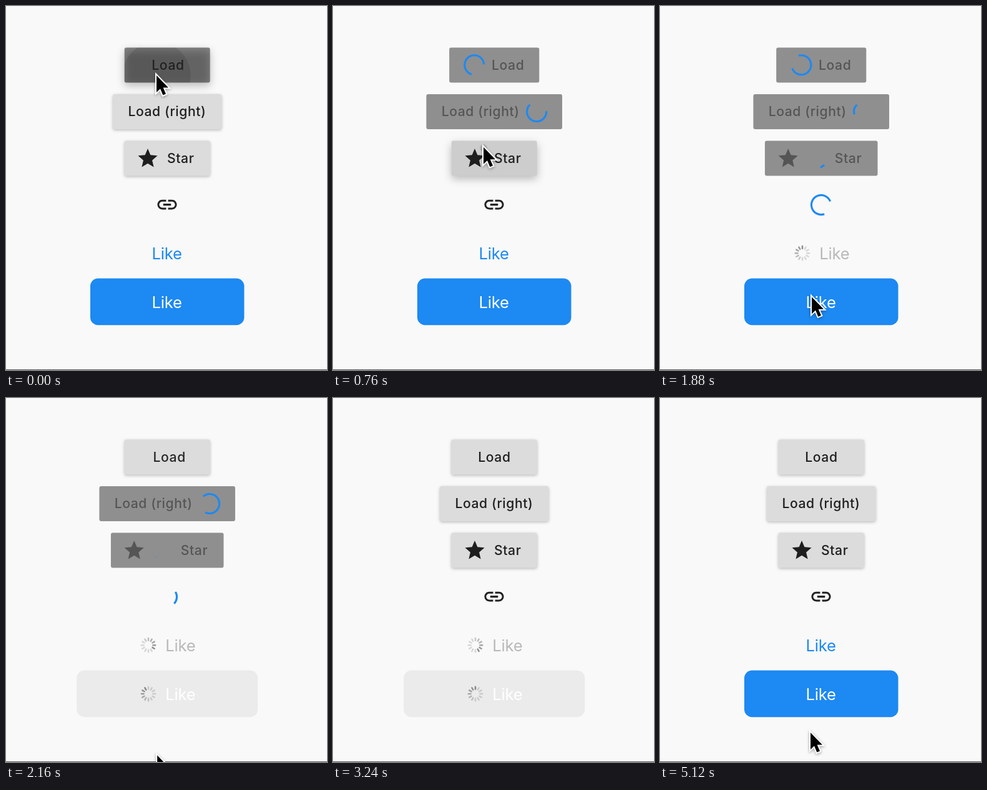
Animation of 514 by 582 pixels, one loop 5.2 s. Source, as an HTML page with a canvas:

```html
<!DOCTYPE html>
<html lang="en">
<head>
<meta charset="utf-8">
<title>Loading buttons</title>
<style>
html, body { margin: 0; width: 100%; height: 100%; overflow: hidden; background: #f9f9f9; }
canvas { display: block; width: 514px; height: 582px; }
</style>
</head>
<body>
<canvas id="stage"></canvas>
<script>
const W = 514, H = 582, LOOP = 5200, DP = 14 / 9;
const LOADING = 2000, FADE = 200, SLOT = 28 * DP, GAP = 6.2;
const BLUE = '#1d89f2', PAPER = '#f9f9f9';
const BUTTON_FONT = '500 21.1px Inter, Roboto, sans-serif';
const LIKE_FONT = '400 25.6px Inter, Roboto, sans-serif';

const canvas = document.getElementById('stage');
const ctx = canvas.getContext('2d');
const ratio = window.devicePixelRatio || 1;
canvas.width = W * ratio;
canvas.height = H * ratio;

const starIcon = new Path2D('M12 17.27L18.18 21l-1.64-7.03L22 9.24l-7.19-.61L12 2 9.19 8.63 2 9.24l5.46 4.73L5.82 21z');
const linkIcon = new Path2D('M3.9 12c0-1.71 1.39-3.1 3.1-3.1h4V7H7c-2.76 0-5 2.24-5 5s2.24 5 5 5h4v-1.9H7c-1.71 0-3.1-1.39-3.1-3.1zM8 13h8v-2H8v2zm9-6h-4v1.9h4c1.71 0 3.1 1.39 3.1 3.1s-1.39 3.1-3.1 3.1h-4V17h4c2.76 0 5-2.24 5-5s-2.24-5-5-5z');
const arrow = new Path2D('M0 0V27L6 21.3 10.3 31.5 15 29.5 10.6 19.6H19Z');

// time, x, y of the pointer tip
const pointerKeys = [
  [0, 241, 111], [180, 241, 111], [360, 241, 168], [440, 241, 170],
  [680, 241, 225], [800, 241, 226], [1080, 241, 318], [1180, 241, 322],
  [1240, 241, 341], [1440, 241, 392], [1580, 242, 398], [1820, 243, 463],
  [1960, 243, 468], [2200, 242, 592], [4520, 236, 592], [4640, 241, 531],
  [5040, 241, 531], [5120, 241, 535], [5200, 241, 535]
];

const clamp = v => Math.min(1, Math.max(0, v));
const mix = (a, b, k) => a + (b - a) * k;
const black = a => `rgba(0,0,0,${a})`;

// cubic-bezier(.4, 0, .2, 1)
function fastOutSlowIn(x) {
  if (x <= 0 || x >= 1) return clamp(x);
  let lo = 0, hi = 1;
  for (let i = 0; i < 18; i++) {
    const u = (lo + hi) / 2, v = 1 - u;
    if (1.2 * v * v * u + 0.6 * v * u * u + u * u * u < x) lo = u; else hi = u;
  }
  return 3 * (1 - lo) * lo * lo + lo * lo * lo;
}

function loadState(t, start) {
  const age = t - start;
  const on = age >= 0 && age < LOADING;
  const open = age < LOADING ? clamp(age / FADE) : 1 - clamp((age - LOADING) / FADE);
  return { age, on, open, room: SLOT * open };
}

function roundRect(x, y, w, h, r) {
  ctx.beginPath();
  ctx.roundRect(x, y, w, h, r);
}

function label(text, x, y, font, spacing, color) {
  ctx.font = font;
  ctx.letterSpacing = spacing + 'px';
  ctx.textAlign = 'center';
  ctx.fillStyle = color;
  ctx.fillText(text, x, y);
}

function icon(path, x, y, color) {
  ctx.save();
  ctx.translate(x - 12 * DP, y - 12 * DP);
  ctx.scale(DP, DP);
  ctx.fillStyle = color;
  ctx.fill(path);
  ctx.restore();
}

function shadow(x, y, w, h, elevation) {
  if (elevation <= 0.02) return;
  const far = 2000;
  ctx.save();
  ctx.shadowColor = black(0.26 * clamp(elevation / 2));
  ctx.shadowBlur = (2 + elevation * 1.5) * ratio;
  ctx.shadowOffsetX = far * ratio;
  ctx.shadowOffsetY = (0.5 + elevation * 0.55) * ratio;
  ctx.fillStyle = '#000';
  roundRect(x - far, y, w, h, 3);
  ctx.fill();
  ctx.restore();
}

function ringSpinner(x, y, age) {
  const PATH = 1333, TURN = 2222;
  const phase = age % PATH / PATH;
  const head = fastOutSlowIn(phase * 2), tail = fastOutSlowIn(phase * 2 - 1);
  const start = Math.PI * (-0.5 + 1.5 * tail + 2 * age / TURN + 0.5 * phase);
  ctx.beginPath();
  ctx.arc(x, y, 10 * DP, start, start + Math.max(0.01, 1.5 * Math.PI * (head - tail)));
  ctx.lineWidth = 2 * DP;
  ctx.strokeStyle = BLUE;
  ctx.stroke();
}

function tickSpinner(x, y, age) {
  const r = 12.4, active = Math.floor(age % 1000 / 1000 * 12);
  ctx.save();
  ctx.translate(x, y);
  for (let i = 0; i < 12; i++) {
    const step = (i + active) % 12;
    ctx.fillStyle = `rgba(60,60,68,${Math.max(47, 147 - 16.6 * step) / 255})`;
    roundRect(-r, -r / 10, r / 2, r / 5, r / 10);
    ctx.fill();
    ctx.rotate(-Math.PI / 6);
  }
  ctx.restore();
}

// Spinner inside its slot, clipped while the slot is opening
function slotSpinner(draw, cx, cy, dx, s) {
  if (!s.on) return;
  ctx.save();
  if (s.open < 1) {
    ctx.beginPath();
    ctx.rect(cx - s.room / 2, cy - 17 * s.open, s.room, 34 * s.open);
    ctx.clip();
  }
  draw(cx + dx, cy, s.age);
  ctx.restore();
}

function buttonElevation(age) {
  if (age < 0) return mix(2, 8, fastOutSlowIn((age + 150) / 120));
  if (age < LOADING) return mix(8, 0, fastOutSlowIn(age / FADE));
  return mix(0, 2, fastOutSlowIn((age - LOADING) / FADE));
}

function raisedButton(cx, y, w, s, tapY) {
  const x = cx - w / 2, h = 36 * DP;
  shadow(x, y, w, h, buttonElevation(s.age));
  roundRect(x, y, w, h, 3);
  ctx.fillStyle = s.on ? black(0.427) : '#dcdcdc';
  ctx.fill();
  const fade = 1 - clamp(s.age / FADE);
  const press = clamp((s.age + 150) / 80) * fade;
  if (press <= 0) return;
  ctx.fillStyle = black(0.07 * press);
  ctx.fill();
  ctx.save();
  ctx.clip();
  ctx.beginPath();
  ctx.arc(241, tapY, Math.max(0, 6 + (s.age + 30) * 1.22), 0, 7);
  ctx.fillStyle = black(0.12 * fade);
  ctx.fill();
  ctx.restore();
}

function ink(s) {
  const v = Math.round(mix(0x1e, 0x55, s.open));
  return `rgb(${v},${v},${v})`;
}

function loadButton(t) {
  const s = loadState(t, -10);
  raisedButton(258.2, 66.5, Math.max(137, 100.5 + s.room), s, 112);
  slotSpinner(ringSpinner, 232.5, 94.3, -GAP, s);
  label('Load', 258.4 + s.room / 2, 101.8, BUTTON_FONT, 0.6, ink(s));
}

function rightButton(t) {
  const s = loadState(t, 382);
  raisedButton(258.2, 141, 174 + s.room, s, 170);
  slotSpinner(ringSpinner, 319.9, 169, GAP, s);
  label('Load (right)', 257.9 - s.room / 2, 176.4, BUTTON_FONT, 0.6, ink(s));
}

function starButton(t) {
  const s = loadState(t, 790);
  raisedButton(258.2, 215.5, 137 + s.room, s, 227);
  icon(starIcon, 227 - s.room / 2, 243.6, ink(s));
  slotSpinner(ringSpinner, 257.8, 243.4, -GAP, s);
  label('Star', 279.7 + s.room / 2, 251, BUTTON_FONT, 0.6, ink(s));
}

function linkButton(t) {
  const s = loadState(t, 1185);
  const grow = fastOutSlowIn((t - 1080) / 140);
  const fade = 1 - clamp((t - 1240) / FADE);
  if (grow > 0 && fade > 0) {
    ctx.beginPath();
    ctx.arc(258, 318, 54 * grow, 0, 7);
    ctx.fillStyle = `rgba(0,10,5,${0.09 * fade})`;
    ctx.fill();
  }
  if (s.on) ringSpinner(258, 318, s.age);
  else icon(linkIcon, 258, 317.6, '#222');
}

function likeButton(t, start, y, filled) {
  const s = loadState(t, start);
  ctx.save();
  if (s.age >= -60) ctx.globalAlpha = mix(0.4, 1, clamp(s.age / 100));
  if (filled) {
    const w = 246.5 + s.room;
    roundRect(258.2 - w / 2, y - 37.5, w, 74.7, 8 * DP);
    ctx.fillStyle = s.on ? '#ebebeb' : BLUE;
    ctx.fill();
  }
  slotSpinner(tickSpinner, 234.2, y, -GAP, s);
  const color = filled ? '#fff' : s.on ? '#b9b9b9' : BLUE;
  label('Like', 257.6 + s.room / 2, y + 9.6, LIKE_FONT, -0.2, color);
  ctx.restore();
}

function pointer(t) {
  let i = 0;
  while (i < pointerKeys.length - 2 && pointerKeys[i + 1][0] <= t) i++;
  const [t0, x0, y0] = pointerKeys[i], [t1, x1, y1] = pointerKeys[i + 1];
  const k = clamp((t - t0) / (t1 - t0));
  ctx.save();
  ctx.translate(mix(x0, x1, k), mix(y0, y1, k));
  ctx.lineWidth = 4;
  ctx.lineJoin = 'miter';
  ctx.strokeStyle = '#fff';
  ctx.shadowColor = black(0.35);
  ctx.shadowBlur = 4 * ratio;
  ctx.shadowOffsetY = 1.5 * ratio;
  ctx.stroke(arrow);
  ctx.shadowColor = 'transparent';
  ctx.fillStyle = '#000';
  ctx.fill(arrow);
  ctx.restore();
}

// 40 ms steps, with a few longer holds near the start
function snap(t) {
  if (t < 400) return [200, 120, 40, 0].find(v => v <= t);
  return Math.floor(t / 40) * 40;
}

function draw(now) {
  const t = snap(now % LOOP);
  ctx.setTransform(ratio, 0, 0, ratio, 0, 0);
  ctx.fillStyle = PAPER;
  ctx.fillRect(0, 0, W, H);
  loadButton(t);
  rightButton(t);
  starButton(t);
  linkButton(t);
  likeButton(t, 1560, 395.2, false);
  likeButton(t, 1950, 473, true);
  ctx.fillStyle = '#5a5a5a';
  ctx.fillRect(0, 581, W, 1);
  pointer(t);
}

const origin = performance.now();
function tick() {
  draw(performance.now() - origin);
  requestAnimationFrame(tick);
}
tick();
</script>
</body>
</html>
```
